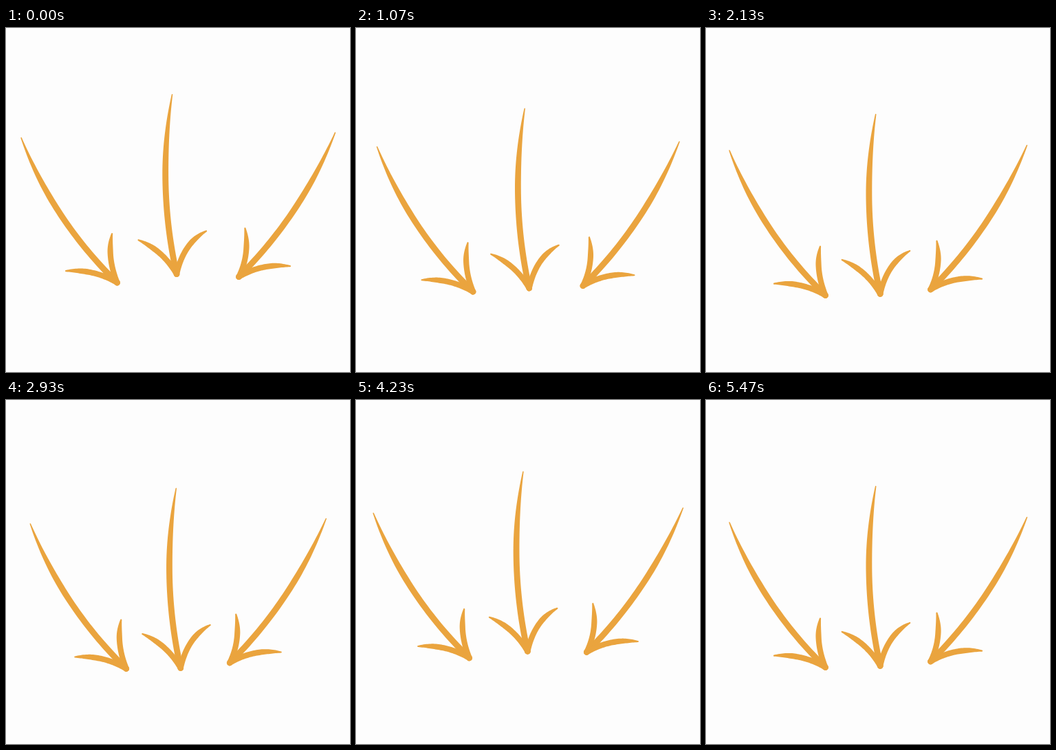
An HTML page with a canvas for the animation above (5.51 s loop, 500 by 500 pixels).

```html
<!DOCTYPE html>
<html>
<head>
<meta charset="utf-8">
<style>
html, body { margin: 0; width: 100%; height: 100%; overflow: hidden; background: #fdfdfd; }
canvas { display: block; width: 500px; height: 500px; }
</style>
</head>
<body>
<canvas id="stage" width="500" height="500"></canvas>
<script>
const ctx = document.getElementById('stage').getContext('2d');
const LOOP = 5510, COLOR = '#eaa43e';
const SHAFT = { tip: 1.5, grow: 7.3, taper: 0.45 };
const BARB = { tip: 2.2, grow: 6, taper: 0.4 };

// Brush stroke along a quadratic curve, pointed at the start and round at the end
function brush(x0, y0, cx, cy, x1, y1, shape) {
  const path = new Path2D(), steps = 40, H = Math.PI / 2;
  const nodes = [];
  for (let i = 0; i <= steps; i++) {
    const t = i / steps, u = 1 - t;
    nodes.push({
      x: u * u * x0 + 2 * u * t * cx + t * t * x1,
      y: u * u * y0 + 2 * u * t * cy + t * t * y1,
      a: Math.atan2(u * (cy - y0) + t * (y1 - cy), u * (cx - x0) + t * (x1 - cx)),
      r: (shape.tip + shape.grow * Math.sin(H * Math.min(1, t / shape.taper))) / 2
    });
  }
  const side = (n, turn) =>
    path.lineTo(n.x + n.r * Math.cos(n.a + turn), n.y + n.r * Math.sin(n.a + turn));
  const first = nodes[0], last = nodes[steps];
  path.arc(first.x, first.y, first.r, first.a + H, first.a + 3 * H);
  nodes.forEach(n => side(n, -H));
  path.arc(last.x, last.y, last.r, last.a - H, last.a + H);
  nodes.reverse().forEach(n => side(n, H));
  path.closePath();
  return path;
}

// Each stroke gives its pointed end and its bend; all three meet at the head
function arrow(dx, dy, hx, hy, shaft, ...barbs) {
  const strokes = [brush(...shaft, hx, hy, SHAFT)];
  for (const b of barbs) strokes.push(brush(...b, hx, hy, BARB));
  return { dx, dy, strokes };
}

const arrows = [
  arrow(0.415, 0.64, 161.5, 370, [22, 159.5, 68, 279], [154, 299, 146.5, 333], [87, 353, 127.5, 350]),
  arrow(0.18, 1, 248, 357.5, [241.5, 96.5, 219, 227], [192.5, 308, 228, 323], [291, 295, 258, 312]),
  arrow(-0.415, 0.64, 338.5, 361.5, [478.5, 152, 429.5, 271], [347.5, 291, 354.5, 329], [413, 346, 372.5, 341.5])
];

// Steady back-and-forth travel; the first two swings are slightly shorter
function travel(step) {
  const early = step < 49;
  const period = early ? 24.25 : 25;
  const phase = (step - (early ? 0.5 : 49) + period) % period;
  const away = Math.min(phase, period - phase);
  return Math.max(-0.7, 3.03 * away - 1.3);
}

function draw(now) {
  const step = Math.min(164, Math.floor((now % LOOP) * 0.03 + 0.15));
  const d = travel(step);
  ctx.fillStyle = '#fdfdfd';
  ctx.fillRect(0, 0, 500, 500);
  ctx.fillStyle = COLOR;
  for (const a of arrows) {
    ctx.save();
    ctx.translate(a.dx * d, a.dy * d);
    a.strokes.forEach(s => ctx.fill(s));
    ctx.restore();
  }
}

let start = null;
function tick(now) {
  if (start === null) start = now;
  draw(now - start);
  requestAnimationFrame(tick);
}
draw(0);
requestAnimationFrame(tick);
</script>
</body>
</html>
```
